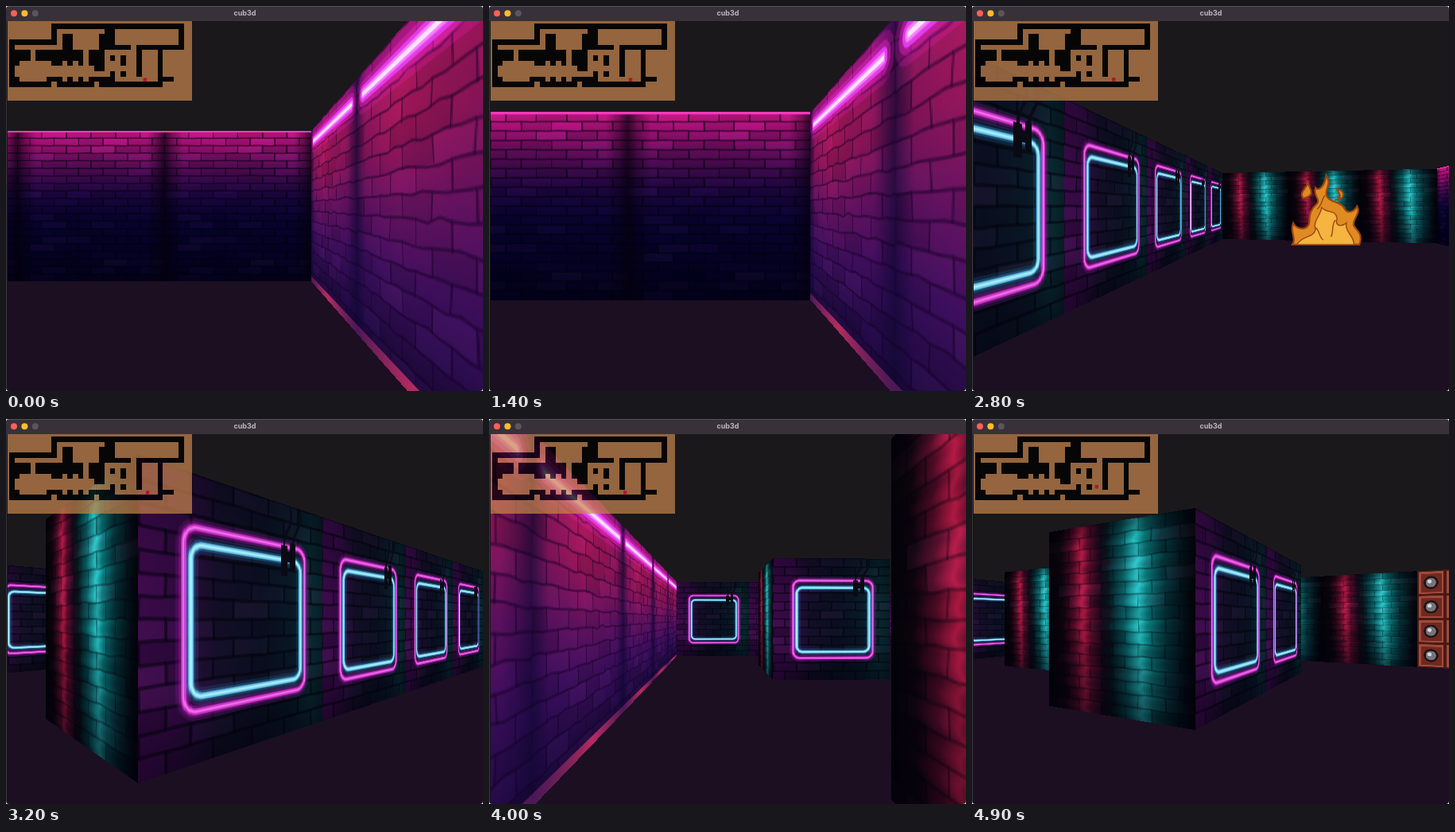
These frames come from a looping animation (600x484 px, 5000 ms). An HTML page with a canvas:

```html
<!DOCTYPE html>
<html lang="en">
<head>
<meta charset="utf-8">
<title>cub3d</title>
<style>
html, body { margin: 0; width: 100%; height: 100%; overflow: hidden; background: #1a181b; }
canvas { display: block; width: 600px; height: 484px; }
</style>
</head>
<body>
<canvas id="stage" width="600" height="484"></canvas>
<script>
const ctx = document.getElementById('stage').getContext('2d');
const LEFT = 2, TOP = 19, W = 598, H = 465, MID = TOP + H / 2;
const PLANE = 0.66, FOCAL = W / 2 / PLANE, CX = LEFT + W / 2;
const LOOP = 5000, STEP = 100, TS = 256;

const MAP = [
  '        1111111111111111111111111',
  '        1000000000110000000000001',
  '        1011000001110000000000001',
  '111111111011000001110000000000001',
  '10000000001100000111111D111111111',
  '11110111111111011100000010001',
  '11110111111111011101010010001',
  '11000000110101011100010010001',
  '10000000000000001100000010001',
  '10000000000000000001010010001',
  '1100000111010101111100000000111',
  '11111111 1111111 111111111111'
];
const cell = (x, y) => (MAP[y] || '')[x];
const solid = (x, y) => cell(x, y) === '1' || cell(x, y) === 'D';

// time, x, y, heading in degrees (counterclockwise from east)
const PATH = [
  [0, 25.55, 10.55, 0],
  [1400, 26.03, 10.55, 0],
  [1615, 26.03, 10.55, 0],
  [2580, 26.06, 10.52, 102.7],
  [2880, 26.06, 10.52, 102.7],
  [3590, 26.03, 10.55, 177.5],
  [3640, 26.03, 10.55, 177.5],
  [4160, 24.55, 10.49, 177.5],
  [4400, 23.91, 10.37, 152],
  [4550, 23.53, 10.17, 152],
  [4870, 22.88, 9.51, 117.7],
  [4900, 22.84, 9.44, 117.7]
];
const FIRE = { x: 26.5, y: 5.5 };

function randomizer(seed) {
  return () => (seed = (seed * 16807) % 2147483647) / 2147483647;
}

function texture(paint) {
  const c = document.createElement('canvas');
  c.width = c.height = TS;
  paint(c.getContext('2d'));
  return c;
}

// stops: alternating offset, colour
function ramp(g, x0, y0, x1, y1, stops) {
  const grad = g.createLinearGradient(x0, y0, x1, y1);
  for (let i = 0; i < stops.length; i += 2) grad.addColorStop(stops[i], stops[i + 1]);
  return grad;
}

function shade(g, vertical, ...stops) {
  g.fillStyle = ramp(g, 0, 0, vertical ? 0 : TS, vertical ? TS : 0, stops);
  g.fillRect(0, 0, TS, TS);
}

function bricks(g, rows, cols, mortar, thick, rough, vary, seed) {
  const rnd = randomizer(seed), bh = TS / rows, bw = TS / cols;
  const wob = () => (rnd() - 0.5) * rough;
  g.strokeStyle = mortar;
  g.lineWidth = thick;
  for (let r = 0; r < rows; r++) {
    const y = r * bh;
    for (let c = -1; c < cols; c++) {
      const x = (c + (r % 2) / 2) * bw;
      g.fillStyle = rnd() < 0.7 ? `rgba(0,0,12,${rnd() * vary})` : `rgba(255,120,220,${rnd() * vary * 0.2})`;
      g.fillRect(x, y, bw, bh);
      g.beginPath();
      g.moveTo(x + wob(), y + bh);
      g.lineTo(x, y);
      g.lineTo(x + bw * 0.35, y + wob());
      g.lineTo(x + bw * 0.7, y + wob());
      g.lineTo(x + bw, y);
      g.stroke();
    }
  }
}

function glow(g, draw, layers) {
  g.lineCap = 'round';
  for (const [width, color] of layers) {
    g.lineWidth = width;
    g.strokeStyle = color;
    g.beginPath();
    draw();
    g.stroke();
  }
}

const pinkWall = texture(g => {
  shade(g, true, 0, '#9c1a78', 0.12, '#b81a60', 0.3, '#a0175c', 0.5, '#701466', 0.7, '#441062', 0.9, '#260c48', 1, '#1a0834');
  shade(g, false, 0, 'rgba(18,8,56,.78)', 0.1, 'rgba(22,8,66,.25)', 0.4, 'rgba(22,8,66,0)',
    0.85, 'rgba(30,8,76,.2)', 1, 'rgba(18,8,56,.78)');
  bricks(g, 15, 6, 'rgba(22,0,40,.5)', 2, 4, 0.15, 71);
  glow(g, () => { g.moveTo(18, 21); g.lineTo(236, 21); }, [
    [38, 'rgba(255,30,210,.2)'], [25, 'rgba(255,40,225,.35)'], [16, '#e23cea'], [9, '#f884fa'], [4, '#ffe2ff']
  ]);
  g.fillStyle = ramp(g, 0, 0, TS, 0, [0, '#4a1856', 0.5, '#b42c60', 1, '#4a1856']);
  g.fillRect(0, 247, TS, 9);
});

const navyWall = texture(g => {
  shade(g, true, 0, '#d0188c', 0.08, '#b0127c', 0.18, '#780e66', 0.3, '#420a50', 0.42, '#1c0640',
    0.58, '#080330', 0.8, '#040224', 1, '#03011a');
  bricks(g, 20, 6, 'rgba(2,0,14,.6)', 2, 1, 0.18, 29);
  shade(g, false, 0, 'rgba(4,0,12,.72)', 0.05, 'rgba(4,0,12,.35)', 0.13, 'rgba(4,0,12,0)',
    0.88, 'rgba(4,0,12,0)', 0.95, 'rgba(4,0,12,.35)', 1, 'rgba(4,0,12,.72)');
  g.fillStyle = '#f03cb8';
  g.fillRect(0, 0, TS, 3);
});

const neonWall = texture(g => {
  shade(g, false, 0, '#3c0a4a', 0.14, '#340b44', 0.32, '#15102a', 0.55, '#0b1022', 0.75, '#0a1a28', 0.9, '#0a2a32', 1, '#082028');
  bricks(g, 14, 5, 'rgba(2,2,12,.55)', 3, 2, 0.2, 43);
  shade(g, true, 0, 'rgba(0,0,10,.25)', 0.3, 'rgba(0,0,10,0)', 0.7, 'rgba(0,0,10,0)', 1, 'rgba(0,0,10,.45)');
  glow(g, () => g.roundRect(43, 47, 175, 163, 15), [
    [16, 'rgba(220,30,220,.14)'], [10, 'rgba(220,30,220,.25)'], [6, '#c42cc0'], [2.5, '#ee6ce6']
  ]);
  glow(g, () => g.roundRect(51, 62, 159, 135, 13), [
    [16, 'rgba(60,180,255,.12)'], [10, 'rgba(60,180,255,.25)'], [6, '#54b4d8'], [3, '#a8ecfa']
  ]);
  g.fillStyle = '#090a14';
  g.fillRect(174, 46, 11, 34);
  g.fillRect(190, 42, 10, 30);
  g.fillRect(176, 52, 24, 12);
  glow(g, () => {
    g.moveTo(180, 48); g.bezierCurveTo(178, 26, 200, 26, 190, 0);
    g.moveTo(195, 46); g.bezierCurveTo(196, 26, 216, 22, 208, 0);
  }, [[4, '#0a0b16']]);
});

// two lamp beams that lean and ripple down the wall
const tealWall = texture(g => {
  for (let y = 0; y < TS; y++) {
    const v = y / TS, ripple = 0.008 * Math.sin(y * 0.4) + 0.006 * Math.sin(y * 0.17);
    const red = 0.26 + 0.04 * v + ripple, teal = 0.645 + 0.055 * v + ripple;
    g.fillStyle = ramp(g, 0, 0, TS, 0, [
      0, '#030308', red - 0.16, '#10050e', red - 0.07, '#560c28', red, '#c81c4c', red + 0.05, '#6c0e30',
      red + 0.14, '#1a0a1c', teal - 0.2, '#08181e', teal - 0.09, '#09686c', teal, '#2cdcdc',
      teal + 0.06, '#0c8a8a', teal + 0.16, '#063c42', 0.95, '#030e14', 1, '#020408'
    ]);
    g.fillRect(0, y, TS, 1);
  }
  bricks(g, 16, 6, 'rgba(0,4,14,.36)', 2, 3, 0.24, 97);
  shade(g, true, 0, 'rgba(0,0,10,.4)', 0.12, 'rgba(0,0,10,.05)', 0.55, 'rgba(0,0,10,.12)', 1, 'rgba(0,0,10,.65)');
});

const door = texture(g => {
  g.fillStyle = '#4a1a16';
  g.fillRect(0, 0, TS, TS);
  for (let i = 0; i < 16; i++) {
    const x = (i % 4) * 64, y = (i >> 2) * 64;
    g.fillStyle = '#a04a3c';
    g.fillRect(x + 3, y + 3, 58, 58);
    g.fillStyle = '#70281f';
    g.fillRect(x + 9, y + 9, 48, 48);
    for (const [color, r, dx] of [['#1e1416', 17, 0], ['#77747a', 12, 0], ['#d8d6da', 5, -3]]) {
      g.fillStyle = color;
      g.beginPath();
      g.arc(x + 32 + dx, y + 32 + dx, r, 0, 7);
      g.fill();
    }
  }
});

// flame outlines in a unit square: body, core, inner curls
const FLAMES = [
  [
    'M.02 1C.04 .9 .1 .93 .12 .82C.06 .76 .08 .68 .14 .62C.14 .72 .22 .72 .22 .64C.24 .5 .14 .4 .3 .3C.26 .42 .36 .4 .38 .3C.4 .22 .36 .18 .46 .13C.54 .2 .58 .28 .55 .38C.62 .4 .7 .36 .72 .25C.82 .4 .64 .5 .72 .6C.76 .68 .8 .62 .84 .55C.9 .7 .78 .78 .9 .84C.96 .88 .98 .94 .98 1Z' +
    'M.14 .32C.08 .24 .14 .18 .2 .16C.16 .24 .24 .28 .14 .32ZM.62 .28C.6 .2 .64 .16 .68 .15C.7 .22 .68 .26 .62 .28Z',
    'M.18 1C.2 .88 .3 .9 .3 .78C.3 .66 .4 .62 .44 .46C.5 .52 .54 .62 .52 .7C.6 .7 .62 .64 .64 .6C.7 .72 .66 .82 .74 .84C.82 .88 .84 .94 .84 1Z',
    'M.3 .78C.36 .84 .42 .76 .42 .7M.52 .7C.46 .8 .54 .86 .58 .94M.26 .52C.32 .56 .34 .48 .42 .4'
  ],
  [
    'M.06 1C.12 .92 .02 .84 .07 .72C.12 .82 .28 .82 .28 .7C.28 .6 .3 .54 .37 .48C.44 .42 .32 .36 .36 .26C.4 .32 .48 .24 .5 .1C.58 .22 .46 .3 .51 .38C.56 .46 .7 .44 .74 .54C.78 .6 .86 .58 .9 .5C.96 .6 .82 .68 .86 .76C.9 .82 .98 .86 .93 1Z' +
    'M.2 .4C.14 .32 .24 .28 .26 .2C.3 .3 .36 .36 .2 .4ZM.62 .42C.72 .4 .66 .32 .64 .28C.76 .3 .74 .42 .62 .42Z',
    'M.12 1C.18 .88 .34 .92 .36 .8C.32 .7 .42 .64 .44 .52C.52 .6 .62 .54 .64 .66C.6 .78 .72 .76 .76 .72C.74 .84 .86 .88 .86 1Z',
    'M.36 .78C.42 .82 .4 .9 .46 .94M.62 .68C.56 .74 .6 .84 .56 .9M.38 .54C.44 .5 .44 .42 .48 .36'
  ]
].map(set => set.map(d => new Path2D(d)));

function pose(t) {
  let i = 1;
  while (i < PATH.length - 1 && t > PATH[i][0]) i++;
  const a = PATH[i - 1], b = PATH[i];
  const k = Math.min(1, (t - a[0]) / (b[0] - a[0]));
  const [x, y, deg] = [1, 2, 3].map(j => a[j] + (b[j] - a[j]) * k);
  const rad = deg * Math.PI / 180;
  return { x, y, dx: Math.cos(rad), dy: -Math.sin(rad) };
}

function cast(p, rx, ry) {
  let mx = Math.floor(p.x), my = Math.floor(p.y), side = 0;
  const ax = Math.abs(1 / rx), ay = Math.abs(1 / ry);
  const sx = Math.sign(rx), sy = Math.sign(ry);
  let tx = (rx < 0 ? p.x - mx : mx + 1 - p.x) * ax;
  let ty = (ry < 0 ? p.y - my : my + 1 - p.y) * ay;
  for (let n = 0; n < 64 && !solid(mx, my); n++) {
    if (tx < ty) { tx += ax; mx += sx; side = 0; }
    else { ty += ay; my += sy; side = 1; }
  }
  const dist = side ? ty - ay : tx - ax;
  const hit = side ? p.x + dist * rx : p.y + dist * ry;
  const f = hit - Math.floor(hit);
  const flip = side ? ry > 0 : rx < 0;
  const tex = cell(mx, my) === 'D' ? door
    : side ? (ry > 0 ? pinkWall : tealWall)
    : (rx > 0 ? navyWall : neonWall);
  return { dist, u: flip ? 1 - f : f, tex };
}

function drawWalls(p) {
  for (let c = 0; c < W; c++) {
    const cam = (2 * (c + 0.5) / W - 1) * PLANE;
    const { dist, u, tex } = cast(p, p.dx - p.dy * cam, p.dy + p.dx * cam);
    const h = H / dist;
    ctx.drawImage(tex, Math.min(TS - 1, Math.floor(u * TS)), 0, 1, TS, LEFT + c, MID - h / 2, 1, h);
  }
}

function drawFire(p, t) {
  const x = FIRE.x - p.x, y = FIRE.y - p.y;
  const depth = x * p.dx + y * p.dy;
  if (depth < 0.2) return;
  const size = H / depth;
  const sx = CX + (y * p.dx - x * p.dy) / depth * FOCAL;
  if (sx + size < 0 || sx - size > 600) return;
  const [body, core, curls] = FLAMES[Math.floor(t / 200 + 1) % 2];
  ctx.save();
  ctx.translate(sx - size / 2, MID - size / 2);
  ctx.scale(size, size);
  ctx.lineWidth = 0.022;
  ctx.strokeStyle = '#9a4612';
  ctx.fillStyle = '#e08a22';
  ctx.fill(body);
  ctx.stroke(body);
  ctx.fillStyle = '#f6b440';
  ctx.fill(core);
  ctx.lineWidth = 0.014;
  ctx.stroke(core);
  ctx.stroke(curls);
  ctx.restore();
}

function drawMinimap(p) {
  const ox = 4, oy = 22, s = 6.67;
  const walls = new Path2D(), ground = new Path2D();
  ground.rect(LEFT, TOP, 232, 100);
  MAP.forEach((row, y) => [...row].forEach((ch, x) => {
    if (ch !== '1') return;
    const x0 = Math.round(ox + x * s), y0 = Math.round(oy + y * s);
    walls.rect(x0, y0, Math.round(ox + (x + 1) * s) - x0, Math.round(oy + (y + 1) * s) - y0);
  }));
  ground.addPath(walls);
  ctx.fillStyle = 'rgba(200,135,77,.7)';
  ctx.fill(ground, 'evenodd');
  ctx.fillStyle = 'rgba(0,0,0,.75)';
  ctx.fill(walls);
  ctx.fillStyle = '#b4142c';
  ctx.fillRect(ox + p.x * s - 1.8, oy + p.y * s - 2, 4.4, 4.4);
}

function drawFrame() {
  ctx.fillStyle = '#383139';
  ctx.fillRect(0, 0, 600, TOP);
  ctx.fillStyle = '#57505a';
  ctx.fillRect(0, 0, 600, 1);
  ctx.fillStyle = '#39353d';
  ctx.fillRect(0, TOP, 1, H);
  ctx.fillStyle = '#17151a';
  ctx.fillRect(1, TOP, 1, H);
  ['#fe5f57', '#febc2e', '#5b555c'].forEach((color, i) => {
    ctx.fillStyle = color;
    ctx.beginPath();
    ctx.arc(10 + i * 13.4, 9.3, 4, 0, 7);
    ctx.fill();
  });
  ctx.fillStyle = '#bdb7be';
  ctx.font = 'bold 9px Inter, sans-serif';
  ctx.textAlign = 'center';
  ctx.textBaseline = 'alphabetic';
  ctx.fillText('cub3d', 300.5, 12);
  // rounded window corners
  ctx.fillStyle = '#e8e6ea';
  ctx.beginPath();
  ctx.rect(0, 0, 600, 484);
  ctx.roundRect(0, 0, 600, 484, 4);
  ctx.fill('evenodd');
}

function render(t) {
  const p = pose(t);
  ctx.save();
  ctx.beginPath();
  ctx.rect(LEFT, TOP, W, H);
  ctx.clip();
  ctx.fillStyle = '#1a181b';
  ctx.fillRect(LEFT, TOP, W, H);
  ctx.fillStyle = '#1c0f22';
  ctx.fillRect(LEFT, MID, W, H);
  drawWalls(p);
  drawFire(p, t);
  drawMinimap(p);
  ctx.restore();
  drawFrame();
}

const start = performance.now();
function tick() {
  const t = (performance.now() - start) % LOOP;
  render(Math.floor(t / STEP) * STEP);
  requestAnimationFrame(tick);
}
tick();
</script>
</body>
</html>
```
